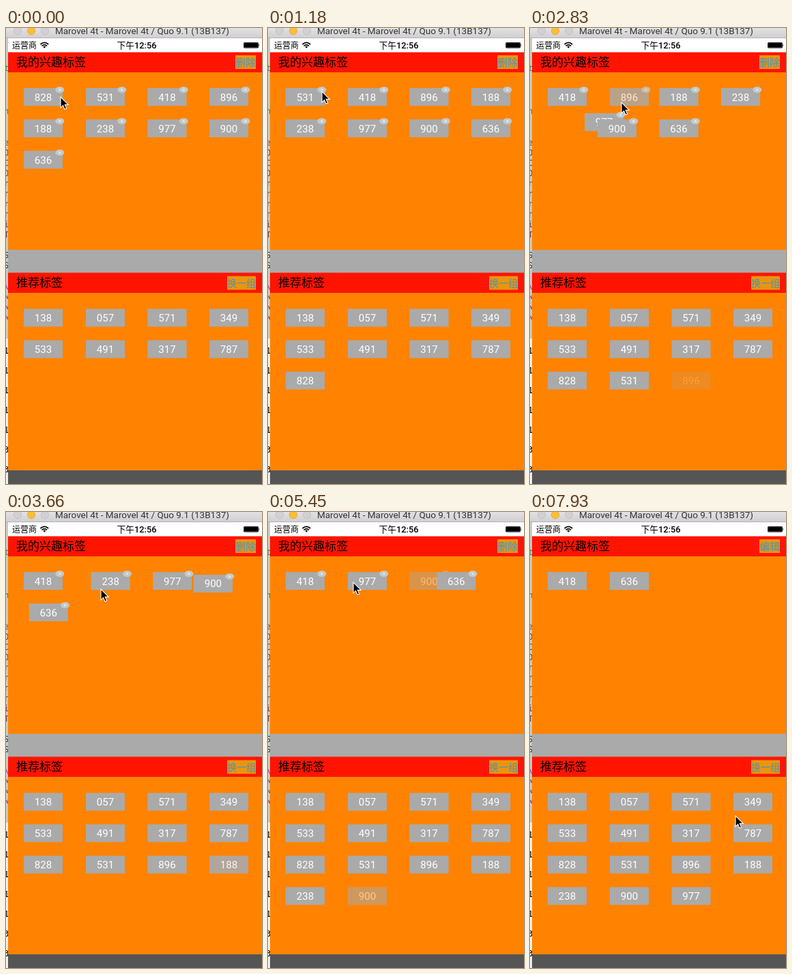
These frames come from a looping animation (375 by 668 pixels, 8 s). An HTML page:

```html
<!DOCTYPE html>
<html lang="zh">
<head>
<meta charset="utf-8">
<title>Tags</title>
<style>
html, body { margin: 0; width: 100%; height: 100%; overflow: hidden; background: #fff; }
svg { display: block; width: 375px; height: 668px; }
text { font-family: Roboto, "Noto Sans CJK SC", "Noto Sans CJK", sans-serif; }
.code { font: 12px "DejaVu Sans Mono", monospace; }
.head { font-size: 17px; }
.tag text { font-size: 15px; fill: #fff; text-anchor: middle; }
.btn { fill: #4592cc; text-anchor: middle; }
</style>
</head>
<body>
<svg id="stage" viewBox="0 0 375 668" xmlns="http://www.w3.org/2000/svg">
  <defs>
    <linearGradient id="bar" x2="0" y2="1">
      <stop offset="0" stop-color="#e3e1e3"/><stop offset="1" stop-color="#d0ced0"/>
    </linearGradient>
    <clipPath id="edge"><rect y="15" width="3" height="653"/></clipPath>
  </defs>
  <rect width="375" height="668" fill="#c6cbc2"/>
  <rect y="455" width="3" height="213" fill="#f0f0f0"/>
  <g id="strip" clip-path="url(#edge)"></g>

  <rect width="375" height="15" fill="url(#bar)"/>
  <rect y="14" width="375" height="1" fill="#b4b2b4"/>
  <g stroke-width=".7">
    <circle cx="17" cy="4" r="5.7" fill="#d2d0d2" stroke="#bcbabc"/>
    <circle cx="37" cy="4" r="5.7" fill="#fdbe35" stroke="#e0a030"/>
    <circle cx="57" cy="4" r="5.7" fill="#d2d0d2" stroke="#bcbabc"/>
  </g>
  <text x="199.5" y="9" font-size="13.5" text-anchor="middle" fill="#333">Marovel 4t - Marovel 4t / Quo 9.1 (13B137)</text>

  <rect x="3" y="15" width="372" height="21" fill="#fff"/>
  <text x="9" y="29.5" font-size="12">运营商</text>
  <g fill="none" stroke="#000" stroke-width="1.7">
    <path d="M50.5 24Q56.3 18.8 62.1 24M52.5 26.3Q56.3 23 60.1 26.3"/>
    <path d="M54.3 27.3Q56.3 25.8 58.3 27.3L56.3 29.7Z" fill="#000" stroke="none"/>
  </g>
  <text x="191.5" y="29.5" font-size="12.8" font-weight="500" text-anchor="middle">下午12:56</text>
  <rect x="348" y="21" width="22" height="8.5" rx="1.8"/>
  <rect x="349" y="22" width="20" height="6.5" rx="1" fill="none" stroke="#fff" stroke-opacity=".4" stroke-width=".6"/>
  <path d="M370.5 24Q372.5 25.3 370.5 26.6Z"/>

  <rect x="3" y="35.5" width="372" height="30" fill="#ff1400"/>
  <rect x="3" y="65" width="372" height="260" fill="#ff8300"/>
  <rect x="3" y="325" width="372" height="34" fill="#aaa"/>
  <rect x="3" y="358.5" width="372" height="30" fill="#ff1400"/>
  <rect x="3" y="388" width="372" height="260" fill="#ff8300"/>
  <rect x="3" y="648" width="372" height="20" fill="#555"/>
  <text class="head" x="15" y="55.5">我的兴趣标签</text>
  <text class="head" x="15" y="379">推荐标签</text>
  <rect x="336" y="40" width="30" height="20" fill="#e9960c"/>
  <text class="btn" id="mode" x="351" y="55.5" font-size="15"></text>
  <rect x="324" y="363.5" width="42" height="20" fill="#e9960c"/>
  <text class="btn" x="345" y="378.5" font-size="14">换一组</text>

  <g id="tags"></g>
  <path id="cursor" d="M0 0V15.800L3.600 12.400 6 18 8.600 16.900 6.200 11.400H11.300Z" stroke="#fff" stroke-width="1.100"/>
</svg>
<script>
const LOOP = 8000, STEP = 118.2, LEAD = 14, FADE = 300, EDIT_END = 7200;
const COLUMNS = [26, 117, 207.5, 298];
const $ = id => document.getElementById(id);
const MINE = '828 531 418 896 188 238 977 900 636'.split(' ');
const OFFERED = '138 057 571 349 533 491 317 787'.split(' ');
const REMOVALS = [[860, '828'], [1450, '531'], [2751, '896'], [3418, '188'],
  [4290, '238'], [5275, '900'], [6050, '977']];
const PATH = [
  [0, 80, 101], [118, 76, 104], [354, 62, 109], [700, 58, 108], [830, 58, 108],
  [1064, 79, 93], [1773, 79, 93], [2010, 98, 100], [2130, 98, 100], [2837, 134, 109],
  [3664, 139, 113], [4610, 134, 106], [4855, 134, 106], [5200, 226, 101],
  [5437, 125, 103], [5674, 109, 104], [6146, 142, 102], [6265, 165, 100],
  [6501, 230, 94], [6737, 336, 53], [6974, 340, 51], [7210, 340, 51], [7919, 301, 445]
];

const clamp = v => Math.max(0, Math.min(1, v));
const ease = v => v * v * (3 - 2 * v);
const mix = (a, b, p) => a + (b - a) * p;
const slot = (i, top) => [COLUMNS[i % 4], top + 46 * Math.floor(i / 4)];

function add(parent, name, attrs, text = '') {
  const el = document.createElementNS('http://www.w3.org/2000/svg', name);
  for (const k in attrs) el.setAttribute(k, attrs[k]);
  el.textContent = text;
  return parent.appendChild(el);
}

function place(el, [x, y], alpha = 1) {
  el.setAttribute('transform', `translate(${x.toFixed(2)} ${y.toFixed(2)})`);
  el.setAttribute('opacity', alpha);
}

function makeTag(label, removable) {
  const g = add($('tags'), 'g', { class: 'tag' });
  add(g, 'rect', { width: 57, height: 26, fill: '#aaa' });
  add(g, 'text', { x: 28.5, y: 18.5 }, label);
  if (removable) {
    g.badge = add(g, 'g', {});
    add(g.badge, 'ellipse', { cx: 52.8, cy: 2.5, rx: 6.5, ry: 4.5, fill: '#c3c9c9' });
    add(g.badge, 'path', { d: 'M51.300 1.200l3 2.600m0-2.600l-3 2.600', stroke: '#fff', 'stroke-width': 0.9 });
  }
  return g;
}

const mine = Object.fromEntries(MINE.map(n => [n, makeTag(n, true)]));
OFFERED.forEach((n, i) => place(makeTag(n), slot(i, 411.5)));
const moved = REMOVALS.map(([, n], i) => {
  const g = makeTag(n);
  place(g, slot(OFFERED.length + i, 411.5), 0);
  return g;
});

// Sliver of the editor behind the phone window
function sliver(chars, y, gap, fill, weight = 400) {
  [...chars].forEach((c, i) =>
    add($('strip'), 'text', { class: 'code', x: -3, y: y + i * gap, fill, 'font-weight': weight }, c));
}
sliver('t', 63, 0, '#1f8a35');
sliver('h', 126, 0, '#1f8a35');
sliver('eOCOrrrriT', 172, 15, '#7a3550');
sliver('SS', 337, 15, '#333');
sliver('\\www', 382, 15, '#a02a90');
sliver('1111133', 477, 29, '#000', 700);

function cursorAt(t) {
  const i = PATH.findIndex(p => p[0] > t);
  if (i < 0) return PATH[PATH.length - 1].slice(1);
  const [t0, x0, y0] = PATH[i - 1], [t1, x1, y1] = PATH[i];
  const p = (t - t0) / (t1 - t0);
  return [mix(x0, x1, p), mix(y0, y1, p)];
}

function draw(time) {
  const t = Math.floor((time + LEAD) / STEP) * STEP;
  let order = MINE;
  const pos = {}, alpha = {};
  order.forEach((n, i) => { pos[n] = slot(i, 88); alpha[n] = 1; });

  REMOVALS.forEach(([start, gone], k) => {
    const p = ease(clamp((t - start) / FADE));
    moved[k].setAttribute('opacity', p);
    if (!p) return;
    alpha[gone] = 1 - p;
    order = order.filter(n => n !== gone);
    order.forEach((n, i) => {
      const to = slot(i, 88);
      pos[n] = pos[n].map((v, j) => mix(v, to[j], p));
    });
  });

  const editing = t < EDIT_END;
  for (const n of MINE) {
    place(mine[n], pos[n], alpha[n]);
    mine[n].badge.setAttribute('visibility', editing ? 'visible' : 'hidden');
  }
  $('mode').textContent = editing ? '删除' : '编辑';
  place($('cursor'), cursorAt(t));
}

const begin = performance.now();
function tick() {
  draw((performance.now() - begin) % LOOP);
  requestAnimationFrame(tick);
}
tick();
</script>
</body>
</html>
```
